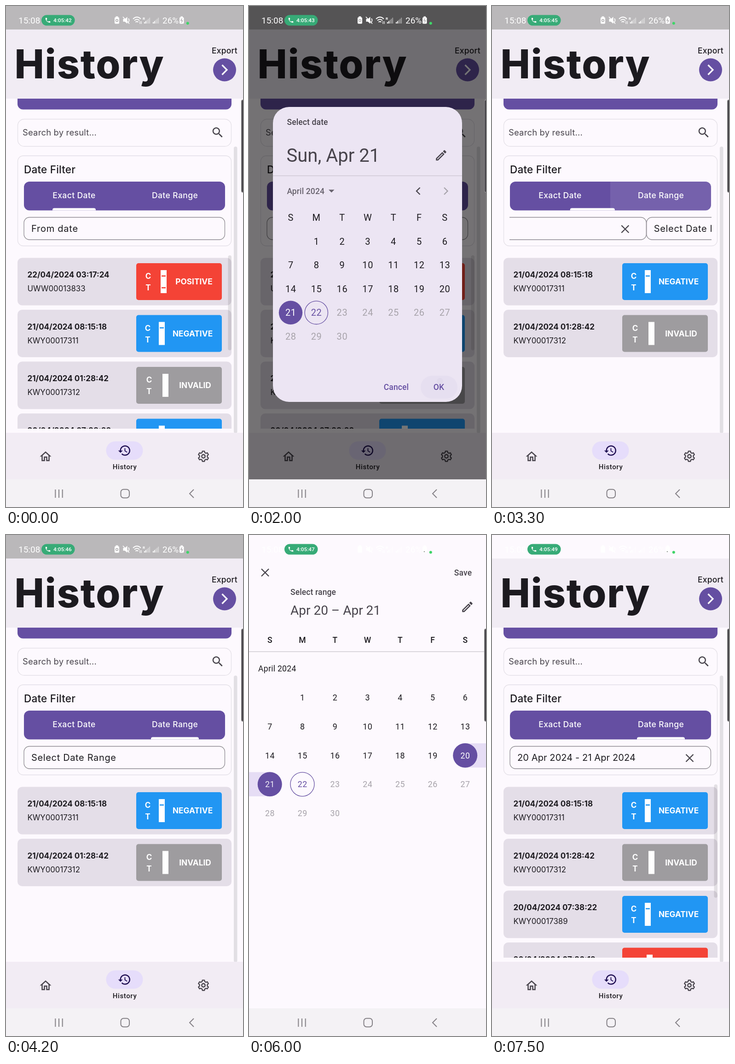
Animation, 515 px wide and 1087 px high, one loop 8000 ms. Source, as an HTML page with a canvas:

```html
<!DOCTYPE html>
<html lang="en">
<head>
<meta charset="utf-8">
<title>History filter</title>
<style>
  html, body { margin: 0; width: 515px; height: 1087px; overflow: hidden; }
  canvas { display: block; width: 515px; height: 1087px; }
</style>
</head>
<body>
<canvas id="stage"></canvas>
<script>
const W = 515, H = 1087, LOOP = 8000;
const canvas = document.getElementById('stage');
const c = canvas.getContext('2d');
const dpr = window.devicePixelRatio || 1;
canvas.width = W * dpr;
canvas.height = H * dpr;

const PURPLE = '#654fa2', PAGE = '#fdf9fe', BAR = '#f1ecf4', INK = '#1c1a1f', SOFT = '#48444c', FADED = '#a7a3aa';
const inter = (size, weight = 400) => `${weight} ${size}px Inter, sans-serif`;
const roboto = (size, weight = 400) => `${weight} ${size}px Roboto, sans-serif`;

const ICONS = {
  search: 'M15.5 14h-.79l-.28-.27C15.41 12.59 16 11.11 16 9.5 16 5.91 13.09 3 9.5 3S3 5.91 3 9.5 5.91 16 9.5 16c1.61 0 3.09-.59 4.23-1.57l.27.28v.79l5 4.99L20.49 19l-4.99-5zm-6 0C7.01 14 5 11.99 5 9.5S7.01 5 9.5 5 14 7.01 14 9.5 11.99 14 9.5 14z',
  home: 'M12 5.69l5 4.5V18h-2v-6H9v6H7v-7.81l5-4.5M12 3L2 12h3v8h6v-6h2v6h6v-8h3L12 3z',
  history: 'M13 3c-4.97 0-9 4.03-9 9H1l3.89 3.89.07.14L9 12H6c0-3.87 3.13-7 7-7s7 3.13 7 7-3.13 7-7 7c-1.93 0-3.68-.79-4.94-2.06l-1.42 1.42C8.27 19.99 10.51 21 13 21c4.97 0 9-4.03 9-9s-4.03-9-9-9zm-1 5v5l4.28 2.54.72-1.21-3.5-2.08V8H12z',
  edit: 'M14.06 9.02l.92.92L5.92 19H5v-.92l9.06-9.06M17.66 3c-.25 0-.51.1-.7.29l-1.83 1.83 3.75 3.75 1.83-1.83c.39-.39.39-1.02 0-1.41l-2.34-2.34c-.2-.2-.45-.29-.71-.29zm-3.6 3.19L3 17.25V21h3.75L17.81 9.94l-3.75-3.75z',
  call: 'M6.62 10.79c1.44 2.83 3.76 5.14 6.59 6.59l2.2-2.2c.27-.27.67-.36 1.02-.24 1.12.37 2.33.57 3.57.57.55 0 1 .45 1 1V20c0 .55-.45 1-1 1-9.39 0-17-7.61-17-17 0-.55.45-1 1-1h3.5c.55 0 1 .45 1 1 0 1.25.2 2.45.57 3.57.11.35.03.74-.25 1.02l-2.2 2.2z',
};

const clamp = v => Math.min(1, Math.max(0, v));
const easeOut = p => 1 - (1 - p) ** 2;
const easeInOut = p => p * p * (3 - 2 * p);
const progress = (t, from, to) => clamp((t - from) / (to - from));

function text(s, x, y, font, color, align = 'left', spacing = 0) {
  c.font = font;
  c.fillStyle = color;
  c.textAlign = align;
  c.letterSpacing = spacing + 'px';
  c.fillText(s, x, y);
}
function rect(x, y, w, h, color, radius = 0) {
  c.beginPath();
  c.roundRect(x, y, w, h, radius);
  c.fillStyle = color;
  c.fill();
}
function frame(x, y, w, h, color, radius, width = 1.3) {
  c.beginPath();
  c.roundRect(x, y, w, h, radius);
  c.strokeStyle = color;
  c.lineWidth = width;
  c.stroke();
}
const disc = (x, y, r, color) => rect(x - r, y - r, 2 * r, 2 * r, color, r);
const ring = (x, y, r, color, width) => frame(x - r, y - r, 2 * r, 2 * r, color, r, width);
function line(path, color, width) {
  c.strokeStyle = color;
  c.lineWidth = width;
  c.stroke(new Path2D(path));
}
function icon(name, x, y, color, scale = 1.252) {
  c.save();
  c.translate(x, y);
  c.scale(scale, scale);
  c.translate(-12, -12);
  c.fillStyle = color;
  c.fill(new Path2D(ICONS[name]));
  c.restore();
}
function cross(x, y, r = 8) {
  line(`M${x - r} ${y - r}l${2 * r} ${2 * r}M${x + r} ${y - r}l${-2 * r} ${2 * r}`, SOFT, 2.4);
}
function clipped(x, y, w, h, radius, draw) {
  c.save();
  c.beginPath();
  c.roundRect(x, y, w, h, radius);
  c.clip();
  draw();
  c.restore();
}
// Touch ripple: grows from the middle of a box, then fades.
function ripple(t, start, x, y, w, h, radius, rgb = '101,79,162') {
  const age = t - start;
  if (age < 0 || age > 600) return;
  const alpha = 0.1 * (1 - progress(age, 250, 600));
  clipped(x, y, w, h, radius, () =>
    disc(x + w / 2, y + h / 2, (0.25 + 0.75 * easeOut(clamp(age / 300))) * w * 0.6, `rgba(${rgb},${alpha})`));
}

function gear(x, y) {
  c.beginPath();
  for (let tooth = 0; tooth < 6; tooth++) {
    for (const [offset, r] of [[-0.33, 8.6], [-0.2, 11.4], [0.2, 11.4], [0.33, 8.6]]) {
      const a = tooth * Math.PI / 3 + offset;
      c.lineTo(x + r * Math.sin(a), y + r * Math.cos(a));
    }
  }
  c.closePath();
  c.lineJoin = 'round';
  c.strokeStyle = SOFT;
  c.lineWidth = 2.3;
  c.stroke();
  c.lineJoin = 'miter';
  ring(x, y, 3.7, SOFT, 2.4);
}

const KINDS = {
  POSITIVE: { color: '#f44336', letters: 309, strip: 336, label: 408.5, marks: [584.5, 610] },
  NEGATIVE: { color: '#2196f3', letters: 308, strip: 332, label: 405.5, marks: [584.5] },
  INVALID: { color: '#9e9c9f', letters: 311, strip: 340, label: 411, marks: [] },
};
const RESULTS = [
  ['22/04/2024 03:17:24', 'UWW00013833', 'POSITIVE'],
  ['21/04/2024 08:15:18', 'KWY00017311', 'NEGATIVE'],
  ['21/04/2024 01:28:42', 'KWY00017312', 'INVALID'],
  ['20/04/2024 07:38:22', 'KWY00017389', 'NEGATIVE'],
  ['20/04/2024 07:36:12', 'UWW00013841', 'POSITIVE'],
];

function resultCard([date, id, kind], row) {
  const k = KINDS[kind];
  c.save();
  c.translate(0, row * 112.5);
  rect(25, 546.5, 465, 103, '#e4dee8', 10);
  text(date, 46.5, 589, inter(17, 700), INK);
  text(id, 46.5, 619, inter(16.8), INK);
  rect(283, 558, 186, 80, k.color, 5);
  text('C', k.letters, 592, inter(17, 700), '#fff', 'center');
  text('T', k.letters, 617, inter(17, 700), '#fff', 'center');
  rect(k.strip, 573, 13, 50, '#fff');
  for (const y of k.marks) rect(k.strip + 2, y, 9, 2.6, k.color);
  text(kind, k.label, 604, inter(17.3, 700), '#fff', 'center');
  c.restore();
}

function dateField(x, label, spacing, clearable) {
  frame(x + 39, 458.5, 436.5, 48.5, '#8f8c92', 12);
  text(label, x + 55, 490, inter(20), INK, 'left', spacing);
  if (clearable) cross(x + 429.5, 484);
}

function historyPage(t) {
  rect(0, 0, W, 1027, PAGE);
  if (t < 4290) rect(0, 0, W, 51, '#bab8ba');
  rect(0, 51, W, 150, BAR);
  text('History', 18.5, 157, inter(86, 800), INK, 'left', 1.7);
  text('Export', 475, 102.5, inter(17.5, 500), INK, 'center', 0.2);
  disc(475, 138.5, 25, PURPLE);
  line('M469.5 128l10.5 10.5l-10.5 10.5', '#fff', 3.2);

  rect(25, 201, 465, 23.5, PURPLE, [0, 0, 12, 12]);
  frame(25.5, 245.5, 464, 59, '#e4e0e7', 14);
  text('Search by result...', 36, 281, inter(18.4), SOFT, 'left', 0.2);
  icon('search', 460, 274.5, SOFT);

  frame(25.5, 325, 464, 195.5, '#e4e0e7', 12);
  text('Date Filter', 39, 362.5, inter(22.5, 500), INK, 'left', 0.2);
  rect(39, 381, 437, 62.5, PURPLE, 12);
  ripple(t, 3090, 257, 381, 219, 62.5, [0, 12, 12, 0], '255,255,255');
  text('Exact Date', 148, 416.5, inter(17.5, 500), '#fff', 'center', 0.4);
  text('Date Range', 367, 416.5, inter(17.5, 500), '#fff', 'center', 0.4);

  const slide = easeInOut(progress(t, 3180, 3500));
  rect(101 + 214 * slide, 438.5, 94 + 10 * slide, 5, '#fff', [4, 4, 0, 0]);
  clipped(38, 457, 439, 52, 0, () => {
    const picked = t >= 2090, ranged = t >= 7390;
    if (slide < 1) dateField(-437 * slide, picked ? '21 Apr 2024' : 'From date', picked ? 0 : 0.75, picked);
    if (slide > 0) dateField(437 * (1 - slide), ranged ? '20 Apr 2024 - 21 Apr 2024' : 'Select Date Range', ranged ? 0.1 : 0.65, ranged);
  });
  ripple(t, 490, 39, 458.5, 436.5, 48.5, 12);

  const rows = t < 2090 ? RESULTS.slice(0, 4) : t < 7390 ? RESULTS.slice(1, 3) : RESULTS.slice(1);
  clipped(0, 530, W, 387, 0, () => {
    rows.forEach(resultCard);
    if (rows.length > 2) rect(482.5, 541, 7.5, t < 2090 ? 206 : 246, 'rgba(0,0,0,.1)', 4);
  });
  rect(495, 305, 7.5, 622, '#e2dfe4', 4);

  rect(0, 926, W, 101, '#f2ecf4');
  rect(217.5, 944.5, 80, 40, '#e6ddfb', 20);
  icon('history', 257.5, 964.5, '#1f0f52');
  text('History', 258, 1004.5, roboto(15, 500), INK, 'center', 0.63);
  icon('home', 86, 977.5, SOFT);
  gear(429, 977);
}

function monthGrid({ x, dx, y, dy, size, spacing, r }, selected) {
  for (let day = 1; day <= 30; day++) {
    const px = x + dx * (day % 7), py = y + dy * Math.floor(day / 7);
    const chosen = selected.includes(day);
    if (chosen) disc(px, py, r, PURPLE);
    else if (day === 22) ring(px, py, r - 0.5, PURPLE, 1.3);
    const color = chosen ? '#fff' : day === 22 ? PURPLE : day > 22 ? FADED : INK;
    text(day, px + spacing / 2, py + size * 0.355, roboto(size), color, 'center', spacing);
  }
}
function weekdays(x, dx, y, font) {
  [...'SMTWTFS'].forEach((d, i) => text(d, x + dx * i, y, font, INK, 'center'));
}

function dateDialog(t) {
  const picked = t >= 1390;
  const medium = roboto(17.5, 500);
  rect(52, 219, 411, 640, '#ece5f3', 35);
  text('Select date', 82.5, 257.5, medium, SOFT, 'left', 0.12);
  text(picked ? 'Sun, Apr 21' : 'Mon, Apr 22', 81.5, 338, roboto(40), SOFT);
  icon('edit', 417.5, 324, SOFT);
  rect(52, 367.8, 411, 1.2, '#cac4d0');
  text('April 2024', 82.5, 407.5, medium, '#67626d', 'left', 0.12);
  c.fillStyle = '#67626d';
  c.fill(new Path2D('M173 398.5h12.5l-6.25 6.25z'));
  line('M371.5 394l-7.5 7.5l7.5 7.5', SOFT, 2.4);
  line('M424 394l7.5 7.5l-7.5 7.5', FADED, 2.4);
  weekdays(90.5, 55.8, 466, roboto(20));
  monthGrid({ x: 90.5, dx: 55.8, y: 510.5, dy: 51.6, size: 20, spacing: 0.63, r: 25.7 }, [picked ? 21 : 22]);
  ripple(t, 1290, 65, 640, 51, 51, 25.5);
  if (t >= 1990) {
    rect(373, 802, 80, 50, '#e6dff0', 25);
    clipped(373, 802, 80, 50, 25, () => disc(415, 814, 7, '#e1daec'));
  }
  text('Cancel', 320, 833, medium, PURPLE, 'center', 0.12);
  text('OK', 412.5, 833, medium, PURPLE, 'center', 0.12);
}

function rangePage(t) {
  const start = t >= 5490, end = t >= 5990;
  const medium = roboto(17.5, 500), big = roboto(28);
  const days = { x: 45.2, dx: 70.75, y: 353, dy: 62.6, size: 17.8, spacing: 0.5, r: 26.5 };
  rect(0, 0, W, 1027, PAGE);
  cross(35, 81.5);
  if (t >= 7290) rect(425, 56.5, 80, 49, '#f8f4f9', 24.5);
  text('Save', 465, 87.5, medium, end ? SOFT : '#b5b2b7', 'center', 0.12);
  text('Select range', 90, 130, medium, SOFT, 'left', 0.12);
  const from = start ? 'Apr 20 – ' : 'Start Date – ';
  text(from, 90, 173, big, start ? SOFT : '#b5b2b7');
  text(end ? 'Apr 21' : 'End Date', 90 + c.measureText(from).width, 173, big, end ? SOFT : '#b5b2b7');
  icon('edit', 474.5, 156, SOFT);
  weekdays(days.x, days.dx, 234, medium);
  rect(0, 252.5, W, 1.2, '#c6c2c8');
  text('April 2024', 20, 296, roboto(17.5), INK, 'left', 0.32);
  if (end) {
    rect(469.5, 452, 46, 52.5, '#e6ddf5');
    rect(0, 514.5, 45, 52.5, '#e6ddf5');
  }
  monthGrid(days, [start && 20, end && 21]);
  ripple(t, 5390, 443, 452, 53, 53, 26.5);
  ripple(t, 5890, 19, 514.5, 53, 53, 26.5);
}

function signal(x) {
  for (let i = 0; i < 5; i++)
    rect(x + i * 2.8, 35 - i * 2.4, 1.9, 3 + i * 2.4, i < 2 ? '#fff' : 'rgba(255,255,255,.45)');
}
function systemBars(t) {
  const ticks = [990, 2090, 3090, 3990, 4990, 6090, 7090];
  const seconds = 42 + ticks.filter(at => t >= at).length;
  const cutout = t < 4290 ? '#a09ea0' : '#fff';
  text('15:08', 27, 38, roboto(19), '#fff');
  rect(77, 19.5, 72.5, 23, '#37ab77', 11.5);
  icon('call', 91, 31, '#fff', 0.58);
  text('4:05:' + seconds, 103, 35.2, roboto(11.8, 500), '#fff');

  rect(236, 24.5, 10, 14, '#fff', 2);
  rect(238.5, 22.5, 5, 3, '#fff');
  ring(241, 31.5, 2.4, cutout, 1.2);
  c.fillStyle = '#fff';
  c.fill(new Path2D('M254.5 28h4l5-4.5v15l-5-4.5h-4z'));
  line('M254 23.5l14 15M266 27q3 4 0 8', '#fff', 1.7);
  line('M276 28q8.5-8 17 0M279 31.5q5.5-5 11 0M281.5 35q3-2.5 6 0', '#fff', 1.8);
  line('M291 39v-6M294 33v6', '#fff', 1.2);
  text('R', 297, 30, roboto(8, 700), '#fff');
  signal(300);
  signal(319);
  text('26%', 340, 38, roboto(19), '#fff');
  rect(377, 24.5, 9.5, 14, '#fff', 2);
  rect(379.5, 22.5, 4.5, 3, '#fff');
  line('M382.5 27l-2.5 4.5h3.5l-2 4.5', cutout, 1.2);
  if (t >= 4390) rect(380, 35.5, 1.5, 1.5, '#333');
  disc(394.8, 37.5, 3, '#3fd468');

  rect(511, 203, 8, 202, '#8b898c', 4);
  rect(512.3, 204.5, 8, 199, '#444246', 3);

  rect(0, 1027, W, 60, '#f4f2f5');
  line('M107.3 1049v18M115 1049v18M122.7 1049v18', '#858287', 2);
  frame(249.5, 1048.8, 18.5, 18.5, '#858287', 6, 2);
  line('M408 1049l-9 9l9 9', '#858287', 2);
}

// Scrim and overlay fade together over the history page.
function overlay(t, from, to, draw) {
  const alpha = easeOut(progress(t, from, from + 180)) * (1 - progress(t, to - 150, to));
  if (!alpha) return;
  c.globalAlpha = alpha;
  rect(0, 0, W, 1027, 'rgba(0,0,0,.54)');
  draw(t);
  c.globalAlpha = 1;
}

function render(now) {
  const t = now % LOOP;
  c.setTransform(dpr, 0, 0, dpr, 0, 0);
  historyPage(t);
  overlay(t, 600, 2190, dateDialog);
  overlay(t, 4215, 7490, rangePage);
  systemBars(t);
  requestAnimationFrame(() => render(performance.now()));
}
render(0);
</script>
</body>
</html>
```
